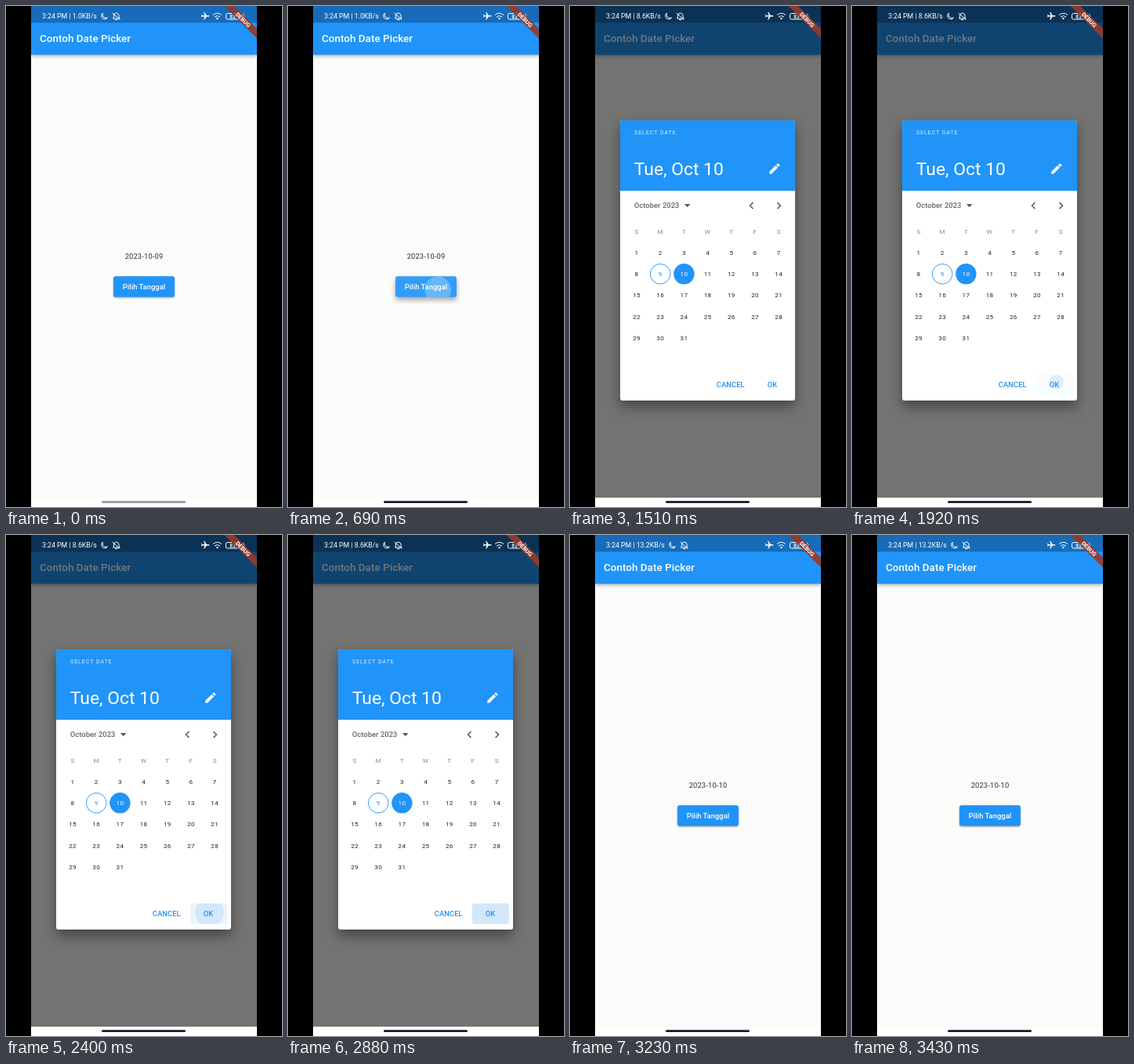
Recreate the animation shown at these times as an HTML page. Size 352x640 px, loop 3500 ms.

```html
<!DOCTYPE html>
<html lang="id">
<head>
<meta charset="utf-8">
<title>Contoh Date Picker</title>
<style>
  html, body { margin: 0; width: 100%; height: 100%; overflow: hidden; background: #000; }
  svg { display: block; font-family: Roboto, sans-serif; }
  .mid { text-anchor: middle; }
  .medium { font-weight: 500; }
  .accent { fill: #2191f3; }
  .line { fill: none; stroke: #fff; stroke-width: 1; }
  #card { filter: drop-shadow(0 8px 8px #0006); }
  #bar { filter: drop-shadow(0 2px 2px #0004); }
</style>
</head>
<body>
<svg width="352" height="640" viewBox="0 0 352 640">
  <defs>
    <clipPath id="screen"><rect x="32" width="288" height="640"/></clipPath>
    <clipPath id="buttonClip"><rect x="137" y="345.3" width="78" height="26.4" rx="2.9"/></clipPath>
    <clipPath id="okClip"><rect x="235" y="470.6" width="47" height="26.4" rx="2.9"/></clipPath>
  </defs>
  <g clip-path="url(#screen)">
    <rect x="32" width="288" height="640" fill="#fbfbfa"/>
    <rect id="bar" x="32" width="288" height="62.4" fill="#2094f8"/>
    <rect x="32" width="288" height="21.3" fill="#176bb9"/>
    <text x="43" y="46" font-size="13.4" letter-spacing=".05" class="medium" fill="#fff">Contoh Date Picker</text>
    <text id="date" x="176" y="323.3" font-size="9.3" letter-spacing=".18" class="mid" fill="#303030"></text>
    <rect id="button" x="137" y="345.3" width="78" height="26.4" rx="2.9" fill="#2094f8"/>
    <g clip-path="url(#buttonClip)" fill="#fff">
      <rect id="buttonGlow" x="137" y="345" width="78" height="27"/>
      <circle id="buttonRipple"/>
    </g>
    <text x="176" y="362" font-size="9.4" letter-spacing=".07" class="mid medium" fill="#fff">Pilih Tanggal</text>

    <rect id="scrim" x="32" width="288" height="628.3"/>
    <g id="dialog">
      <rect id="card" x="64" y="146" width="223" height="358" rx="2.9" fill="#fff"/>
      <path d="M64 236V149q0-3 3-3H284q3 0 3 3V236z" fill="#2094f8"/>
      <text x="82" y="164" font-size="6.8" letter-spacing="1.1" fill="#e8f3fd">SELECT DATE</text>
      <text id="headline" x="81.7" y="216" font-size="22.9" fill="#fff"></text>
      <path transform="translate(252 199) scale(.74)" fill="#fff" d="M3 17.25V21h3.75L17.81 9.94l-3.75-3.75zM20.71 7.04c.39-.39.39-1.02 0-1.41l-2.34-2.34c-.39-.39-1.02-.39-1.41 0l-1.83 1.83 3.75 3.75z"/>
      <text x="81.7" y="258.3" font-size="9.4" letter-spacing=".07" class="medium" fill="#666">October 2023</text>
      <path d="M146 253h7.4l-3.7 4z" fill="#555"/>
      <path d="M233.5 251l-4 4 4 4M264.5 251l4 4-4 4" fill="none" stroke="#555" stroke-width="1.5"/>
      <circle id="today" cx="115.2" cy="342.3" r="12.8" fill="none" stroke="#2191f3" stroke-width=".9"/>
      <circle id="selected" cy="342.3" r="13.2" fill="#2094f8"/>
      <g id="days" class="mid" font-size="8.1" letter-spacing=".29"></g>
      <g clip-path="url(#okClip)" class="accent">
        <rect id="okGlow" x="235" y="470" width="47" height="28"/>
        <circle id="okRipple"/>
      </g>
      <g class="mid medium accent" font-size="9.4" letter-spacing=".07">
        <text x="204.7" y="487.2">CANCEL</text>
        <text x="258" y="487.2">OK</text>
      </g>
    </g>

    <g fill="#fff">
      <text id="status" x="46" y="16.3" font-size="8.75"></text>
      <g id="quiet" class="line">
        <path d="M123.5 9a4.3 4.3 0 1 0 6 6a4.5 4.5 0 0 1-6-6z"/>
        <path d="M136.5 16h8.500l-1-2v-2q-.5-3-3.300-3t-3.200 3v2zM139 17.5h3.5M135.5 9l10 8.5"/>
      </g>
      <path transform="translate(260.5 6.7) rotate(90) scale(.52)" d="M21 16v-2l-8-5V3.5c0-.83-.67-1.5-1.5-1.5S10 2.67 10 3.5V9l-8 5v2l8-2.5V19l-2 1.5V22l3.5-1 3.5 1v-1.5L13 19v-5.5l8 2.5z"/>
      <path class="line" d="M264 11.5q5.5-4.500 11 0M266 14q3.5-3 7 0"/>
      <circle cx="269.5" cy="16" r="1.2"/>
      <rect class="line" x="280.5" y="9.5" width="17" height="7.5" rx="2"/>
      <text x="289" y="15.6" font-size="6.5" class="mid medium">83</text>
      <path d="M303.5 9l-3.500 4.700h2l-1 3.800 4-5h-2.200z"/>
    </g>
    <g transform="translate(320 0) rotate(45)">
      <rect x="-40" y="20.5" width="80" height="8.8" fill="#963a2a" opacity=".92"/>
      <text y="27.600" font-size="7.4" font-weight="700" class="mid" fill="#fff">DEBUG</text>
    </g>
    <rect x="32" y="628.3" width="288" height="12" fill="#fff"/>
    <rect id="pill" x="122" y="632.3" width="107" height="2.8" rx="1.4" fill="#191b2c"/>
  </g>
</svg>
<script>
const LOOP = 3500, OPEN = 820, PICK = 1500, CLOSE = 3024, FADE = 150;
const $ = id => document.getElementById(id);
const clamp = v => Math.min(1, Math.max(0, v));
const mix = (a, b, p) => a + (b - a) * p;
const easeOut = p => 1 - (1 - p) ** 2;
const set = (id, attrs) => { for (const k in attrs) $(id).setAttribute(k, attrs[k]); };
const write = (id, text) => { if ($(id).textContent !== text) $(id).textContent = text; };
const column = i => 85 + i * 30.2;

function addCell(label, col, y, fill) {
  const cell = document.createElementNS('http://www.w3.org/2000/svg', 'text');
  cell.textContent = label;
  cell.setAttribute('x', column(col));
  cell.setAttribute('y', y);
  cell.setAttribute('fill', fill);
  $('days').append(cell);
  return cell;
}
[...'SMTWTFS'].forEach((d, i) => addCell(d, i, 291, '#888'));
const days = Array.from({ length: 31 }, (_, i) =>
  addCell(i + 1, i % 7, 318.2 + Math.floor(i / 7) * 27.1, '#222'));

// Ink spreads from the touch point to the centre of its button.
function ripple(name, t, press, release, from, to, radius, glow, ink) {
  const grow = clamp((t - press) / 1000 + Math.max(0, t - release) / 225);
  const fade = clamp(1 - (t - release) / 300);
  const on = t >= press ? fade : 0;
  set(name + 'Ripple', {
    cx: mix(from[0], to[0], grow), cy: mix(from[1], to[1], grow),
    r: radius * mix(0.3, 1, grow), opacity: ink * on * clamp((t - press) / 75)
  });
  set(name + 'Glow', { opacity: glow * on * clamp((t - press) / 200) });
}

function draw(t) {
  const picked = t >= PICK;
  const shown = easeOut(clamp(Math.min((t - OPEN) / FADE, 1 - (t - CLOSE) / FADE)));
  const speed = t < PICK ? '1.0' : t < 3200 ? '8.6' : '13.2';

  write('date', t < CLOSE ? '2023-10-09' : '2023-10-10');
  write('headline', picked ? 'Tue, Oct 10' : 'Mon, Oct 9');
  write('status', `3:24 PM | ${speed}KB/s`);
  set('quiet', { transform: `translate(${speed.length > 3 ? 5 : 0} 0)` });
  set('pill', { opacity: mix(0.45, 1, clamp(t / 200)) });
  set('scrim', { opacity: 0.54 * shown });
  set('dialog', { opacity: shown });
  set('selected', { cx: column(picked ? 2 : 1) });
  set('today', { opacity: +picked });
  days[8].setAttribute('fill', picked ? '#2191f3' : '#fff');
  days[9].setAttribute('fill', picked ? '#fff' : '#222');

  const lift = clamp(Math.min((t - 530) / 100, 1 - (t - 800) / 100));
  $('button').style.filter = `drop-shadow(0 ${1 + 3 * lift}px ${1 + 2 * lift}px #0005)`;
  ripple('button', t, 530, 800, [194, 363], [176, 358.5], 41, 0.1, 0.26);
  ripple('ok', t, 1850, CLOSE, [261, 480], [258.5, 484], 26.6, 0.09, 0.13);
}

function tick() {
  draw(performance.now() % LOOP);
  requestAnimationFrame(tick);
}
tick();
</script>
</body>
</html>
```
